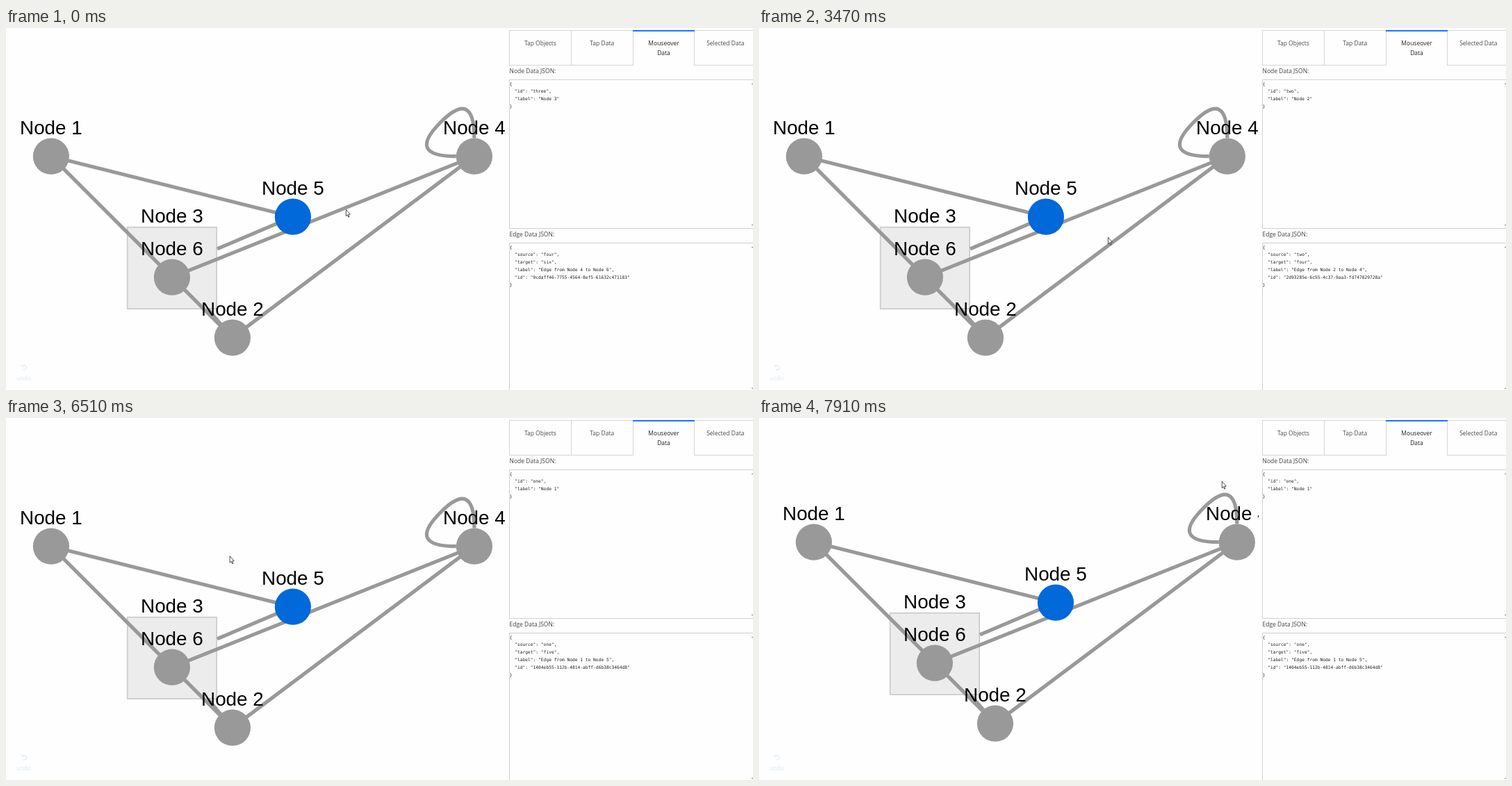
An HTML page with a canvas for the animation above (8000 ms loop, 1075x521 px).

```html
<!DOCTYPE html>
<html lang="en">
<head>
<meta charset="utf-8">
<title>Graph hover data</title>
<style>
  html, body { margin: 0; width: 100%; height: 100%; overflow: hidden; background: #fefefe; }
  canvas { display: block; }
</style>
</head>
<body>
<canvas id="stage" width="1075" height="521"></canvas>
<script>
const ctx = document.getElementById('stage').getContext('2d');
const W = 1075, H = 521, LOOP = 8000;
const START = 1130, STEP = 138, PRESS = 40, RELEASE = 44;
const ZOOM = 1.74, R = 15 * ZOOM, CELL = 50 * ZOOM;
const SANS = '8.5px "Open Sans", sans-serif';
const MONO = '6.26px "DejaVu Sans Mono", monospace';
const LABEL = 16 * ZOOM + 'px "Liberation Sans", Arial, sans-serif';

// Nodes sit on a regular grid.
const at = (col, row) => [64.9 + col * CELL, 184.7 + row * CELL];
const nodes = { one: at(0, 0), two: at(3, 3), four: at(7, 0), five: at(4, 1), six: at(2, 2) };
const order = ['one', 'two', 'three', 'four', 'five', 'six'];
const label = id => 'Node ' + (order.indexOf(id) + 1);
const edges = {
  'one-five': '1404eb55-112b-4814-abff-d6b38c3464d8',
  'two-four': '2d93285e-6c55-4c37-9aa3-fd747829728a',
  'four-six': '9cdaff46-7755-4564-8ef5-61632c471183'
};

const mix = (a, b, f) => a.map((v, i) => v + (b[i] - v) * f);
function along(edge, f) {
  const [a, b] = edge.split('-');
  return mix(nodes[a], nodes[b], f);
}

// Pointer stops: step, place, and what is hovered from there on.
const tour = [
  [-1, [489, 261]],
  [2, [430, 270], 'five'],
  [4, [383, 276]],
  [7, [274, 314], 'three'],
  [9, [242, 350], 'six'],
  [13, [318, 427], 'two'],
  [15, along('two-four', 0.45), 'two-four'],
  [17, [502, 301]],
  [19, along('four-six', 0.37), 'four-six'],
  [23, along('four-six', 0.09)],
  [24, [656, 195], 'four'],
  [25, along('two-four', 0.93), 'two-four'],
  [28, [482, 201]],
  [29, along('four-six', 0.47), 'four-six'],
  [31, [165, 205]],
  [33, nodes.one, 'one'],
  [34, [78, 229]],
  [36, along('one-five', 0.28), 'one-five'],
  [PRESS, [375, 195]],
  [PRESS + 1, [381, 192]],
  [RELEASE, [385, 190]],
  [47, [385, 190]],
  [49, [666, 91]]
];

function stepAt(t) {
  return t < START ? -1 : Math.min(49, Math.floor((t - START) / STEP + 0.14));
}

function pointerAt(s) {
  const i = Math.max(1, tour.findIndex(stop => stop[0] >= s));
  const [s0, a] = tour[i - 1], [s1, b] = tour[i];
  return mix(a, b, (s - s0) / (s1 - s0));
}

function hoverAt(s) {
  const seen = { node: 'three', edge: 'four-six' };
  for (const [step, , item] of tour) {
    if (step <= s && item) seen[item in edges ? 'edge' : 'node'] = item;
  }
  return seen;
}

function panAt(s) {
  const k = Math.min(1, Math.max(0, (s - PRESS) / (RELEASE - PRESS))) ** 0.9;
  return [14 * k, -6 * k];
}

function text(str, x, y, font, color, align = 'left') {
  ctx.font = font;
  ctx.fillStyle = color;
  ctx.textAlign = align;
  ctx.fillText(str, x, y);
}

function disc([x, y], r, color) {
  ctx.fillStyle = color;
  ctx.beginPath();
  ctx.arc(x, y, r, 0, Math.PI * 2);
  ctx.fill();
}

function line(...points) {
  ctx.beginPath();
  points.forEach(p => ctx.lineTo(...p));
  ctx.stroke();
}

function drawLoop([x, y]) {
  const d = 56 * ZOOM;
  ctx.beginPath();
  ctx.moveTo(x, y - R);
  ctx.quadraticCurveTo(x, y - d, x - d / 2, y - d / 2);
  ctx.quadraticCurveTo(x - d, y, x - R, y);
  ctx.stroke();
}

function nodeLabel(id, x, top) {
  text(label(id), x, top - 5.8, LABEL, '#000', 'center');
}

function drawGraph(dx, dy) {
  ctx.save();
  ctx.beginPath();
  ctx.rect(0, 0, 719, H);
  ctx.clip();
  ctx.translate(dx, dy);

  // Compound node around node six.
  const w = 128.4, h = 117.4;
  const [cx, cy] = [nodes.six[0], nodes.six[1] - 13.3];
  ctx.fillStyle = '#ececec';
  ctx.fillRect(cx - w / 2, cy - h / 2, w, h);
  ctx.strokeStyle = '#ccc';
  ctx.lineWidth = ZOOM;
  ctx.strokeRect(cx - w / 2, cy - h / 2, w, h);
  nodeLabel('three', cx, cy - h / 2 - 0.9);

  const { one, two, four, five, six } = nodes;
  ctx.strokeStyle = '#999';
  ctx.lineWidth = 3 * ZOOM;
  line(one, two);
  line(one, five);
  line(two, four);
  line(four, six);
  line(mix([cx, cy], five, 0.374), five);
  line(mix([cx, cy], two, 0.592), two);
  drawLoop(four);

  for (const id in nodes) {
    const [x, y] = nodes[id];
    disc([x, y], R, id === 'five' ? '#0169d9' : '#999');
    nodeLabel(id, x, y - R);
  }
  ctx.restore();
}

function drawUndo() {
  const c = '#d6e7f5';
  ctx.strokeStyle = c;
  ctx.lineWidth = 0.9;
  ctx.beginPath();
  ctx.arc(26.2, 488.8, 3.3, -2.3, 2.2);
  ctx.stroke();
  line([22.8, 484.2], [22.8, 487.2], [25.8, 487.2]);
  text('undo', 25.5, 507, SANS, c, 'center');
}

function drawTabs() {
  const left = 724.5, width = 88.8, active = 2;
  ctx.strokeStyle = '#d6d6d6';
  ctx.lineWidth = 1;
  ['Tap Objects', 'Tap Data', 'Mouseover Data', 'Selected Data'].forEach((name, i) => {
    const x = Math.floor(left + i * width) + 0.5, mid = left + (i + 0.5) * width;
    const on = i === active;
    line([x, 3], [x, 54]);
    line([x, 3.5], [x + width, 3.5]);
    if (!on) line([x, 53.5], [x + width, 53.5]);
    const rows = on ? name.split(' ') : [name];
    rows.forEach((row, j) =>
      text(row, mid, 25.3 + j * 14, SANS, on ? '#222' : '#4a4a4a', 'center'));
  });
  ctx.fillStyle = '#1975fa';
  ctx.fillRect(902, 3, 89, 2);
}

function drawBox(title, top, height, data) {
  text(title, 724.5, top - 10, SANS, '#444');
  ctx.strokeStyle = '#d0d0d0';
  ctx.lineWidth = 1;
  ctx.strokeRect(724.5, top, 360, height);
  JSON.stringify(data, null, 2).split('\n').forEach((row, i) =>
    text(row, 724.7, top + 8.2 + i * 10.77, MONO, '#222'));
  ctx.fillStyle = '#888';
  ctx.fillRect(1073, top + 5.5, 2, 1);
  ctx.fillRect(1073, top + height - 5.5, 2, 1);
}

function drawPanel({ node, edge }) {
  drawTabs();
  drawBox('Node Data JSON:', 74.5, 214, { id: node, label: label(node) });
  const [source, target] = edge.split('-');
  drawBox('Edge Data JSON:', 309.5, 214, {
    source, target,
    label: `Edge from ${label(source)} to ${label(target)}`,
    id: edges[edge]
  });
}

const arrow = new Path2D('M.3 .3V9.8L2.4 7.9 3.7 11.2 5 10.7 3.7 7.4 6.4 7.1Z');
function drawPointer(x, y) {
  ctx.save();
  ctx.translate(x, y);
  ctx.fillStyle = '#fff';
  ctx.fill(arrow);
  ctx.strokeStyle = '#222';
  ctx.lineWidth = 0.8;
  ctx.stroke(arrow);
  ctx.restore();
}

function draw(t) {
  const s = stepAt(t);
  ctx.fillStyle = '#fefefe';
  ctx.fillRect(0, 0, W, H);
  drawGraph(...panAt(s));
  if (s >= PRESS && s < RELEASE) disc([372.5, 195.7], 17.2, 'rgba(0,0,0,0.15)');
  drawUndo();
  drawPanel(hoverAt(s));
  drawPointer(...pointerAt(s));
}

const t0 = performance.now();
function tick() {
  draw((performance.now() - t0) % LOOP);
  requestAnimationFrame(tick);
}
tick();
</script>
</body>
</html>
```
